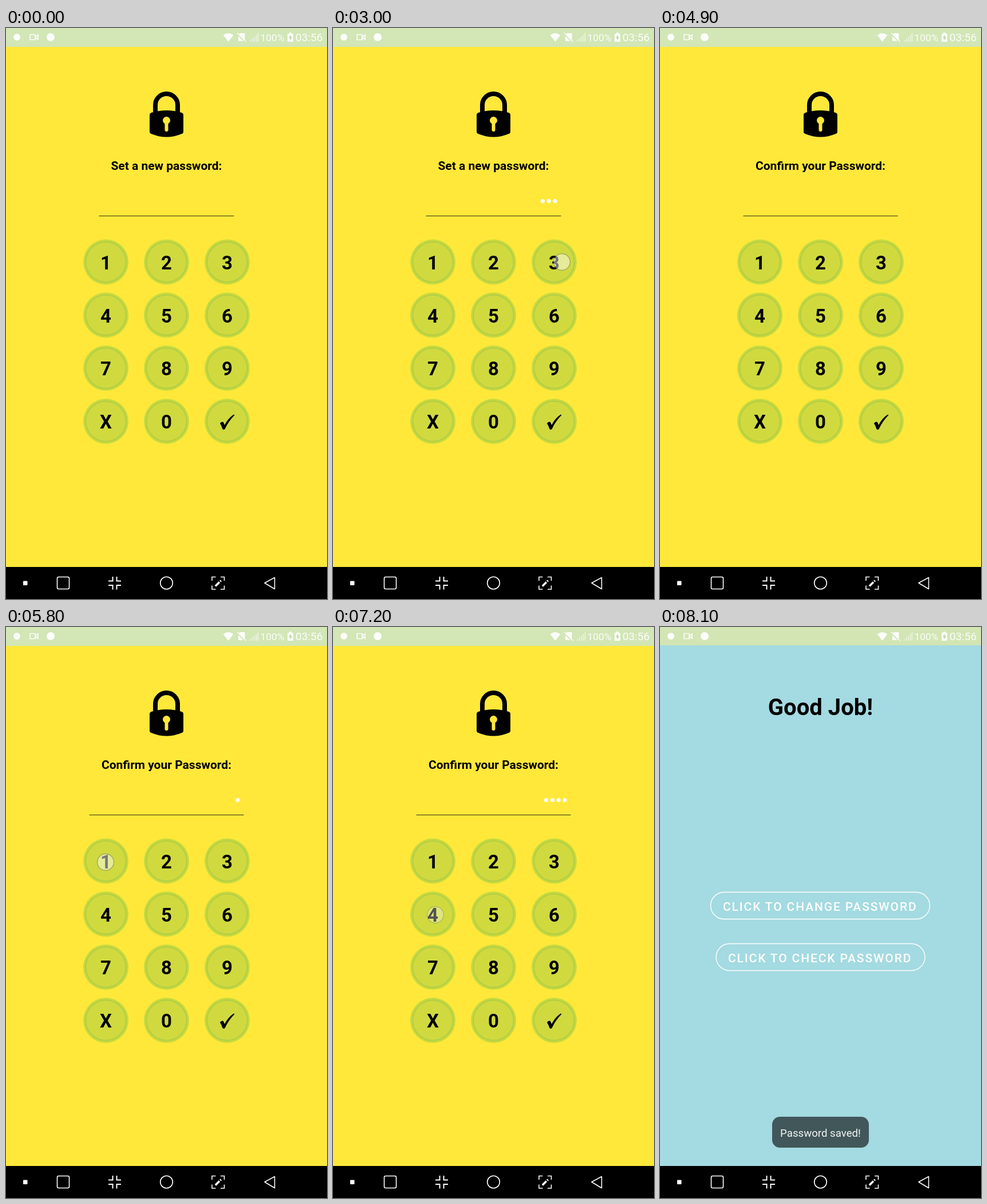
Write an HTML page that moves like this. It is 561 px wide and 998 px high and loops after 9.8 s.

```html
<!DOCTYPE html>
<html lang="en">
<head>
<meta charset="utf-8">
<title>Password keypad</title>
<style>
  html, body { margin: 0; width: 100%; height: 100%; overflow: hidden; }
  svg { display: block; width: 561px; height: 998px; font-family: Roboto, sans-serif; }
  .bold { font-weight: 700; text-anchor: middle; }
  .button { font-size: 21px; font-weight: 500; letter-spacing: 1.87px; fill: #fff; }
  .pill { fill: none; stroke: #fff; stroke-width: 1.4; }
</style>
</head>
<body>
<svg viewBox="0 0 561 998">
  <g id="lockPage">
    <rect width="561" height="998" fill="#ffe83a"/>
    <rect width="561" height="33" fill="#d2e6b6"/>
    <path d="M261 150V134.500a19.500 19.500 0 0 1 39 0V150" fill="none" stroke="#000" stroke-width="8"/>
    <path d="M251 152q0-3 3-4Q280.500 140 307 148q3 1 3 4V181q0 3-3 4Q280.500 196 254 185q-3-1-3-4z"/>
    <circle cx="280.5" cy="161.500" r="6.500" fill="#ffe83a"/>
    <path d="M280.500 162V178" stroke="#ffe83a" stroke-width="6" stroke-linecap="round"/>
    <text id="prompt" class="bold" x="280.5" y="248" font-size="21"></text>
    <path id="underline" stroke="#000" stroke-opacity=".8"/>
    <g id="dots" fill="#fff"></g>
    <g id="keys"></g>
    <path d="M374 691q3-4 6-2l2 5Q388 682 398 675.500l1.500 1Q389 687 382.500 701q-2 2-4 0Q377 696 374 691z"/>
    <circle id="touch" r="14.500" fill="#fff" stroke="#777" stroke-width="1.500"/>
  </g>

  <g id="donePage">
    <rect width="561" height="998" fill="#a4dae1"/>
    <rect width="561" height="32" fill="#d2e5b3"/>
    <text class="bold" x="280.5" y="154" font-size="40">Good Job!</text>
    <rect class="pill" x="88.5" y="463.5" width="383" height="47" rx="23.500"/>
    <text class="button" x="110" y="496">CLICK TO CHANGE PASSWORD</text>
    <rect class="pill" x="98" y="553.5" width="365" height="47" rx="23.500"/>
    <text class="button" x="119" y="586">CLICK TO CHECK PASSWORD</text>
  </g>

  <g id="toast">
    <rect x="196" y="856" width="169" height="54" rx="13.500" fill-opacity=".6"/>
    <text x="280.5" y="890.500" font-size="18.670" text-anchor="middle" fill="#f4f4f4">Password saved!</text>
  </g>

  <!-- status bar -->
  <g fill="#fff" opacity=".92">
    <circle cx="19" cy="16" r="6"/>
    <path d="M42 11.500h9v9h-9zM52 15l4-3v8l-4-3" fill="none" stroke="#fff" stroke-width="1.700"/>
    <circle cx="78" cy="16" r="7"/>
    <path d="M379.500 12.500Q388.500 5.500 397.500 12.500L388.500 24z"/>
    <path d="M409 9h8.500v14H406V12z"/>
    <path d="M403.500 9.500L419 25" stroke="#d2e6b6" stroke-width="3"/>
    <path d="M404 8.500L419.500 24" stroke="#fff" stroke-width="1.500"/>
    <path d="M427 24v-3M430.500 24v-6M434 24v-9M437.500 24v-12M440.500 24V8.500" stroke="#fff" stroke-width="1.800" opacity=".55"/>
    <text x="444.5" y="23" font-size="17.300">100%</text>
    <path d="M492 10h3V8h4v2h3v14h-10z"/>
    <path d="M498 11.500l-4 6h2.500v4.500l4-6H498z" fill="#c2d5a5"/>
    <text x="506" y="23" font-size="19">03:56</text>
  </g>

  <!-- navigation bar -->
  <rect y="942" width="561" height="56"/>
  <g fill="none" stroke="#fff" stroke-width="1.600">
    <rect x="30" y="966.500" width="7.500" height="7.500" rx="1" fill="#fff" stroke="none"/>
    <rect x="89.500" y="959.500" width="21" height="21" rx="2.500"/>
    <path d="M179 966.500h7.500V959M201 966.500h-7.500V959M179 974h7.500v7.500M201 974h-7.500v7.500" stroke-width="2"/>
    <circle cx="280.500" cy="970" r="10.800"/>
    <path d="M360 966v-6.500h6.500M375 959.500h6.500v6.500M381.500 974.500v6.500H375M366.500 981H360v-6.500"/>
    <path d="M366 975.500l7-7" stroke-width="3.500"/>
    <path d="M374.300 967.200l1.500-1.500" stroke-width="3.500"/>
    <path d="M452 970L469.500 960.500v20z" stroke-linejoin="round"/>
  </g>
</svg>

<script>
const LOOP = 9800, CONFIRM = 4800, DONE = 8100, STEP = 100;
// start time, steps visible, x, y
const taps = [
  [2000, 2, 176, 411], [2400, 3, 282, 411], [2900, 3, 400, 409], [3500, 3, 180, 503], [4600, 2, 401, 686],
  [5700, 2, 174, 411], [6100, 3, 282, 411], [6600, 3, 400, 409], [7000, 3, 179, 503], [7700, 2, 400, 686]
];
const digitTimes = taps.filter((_, i) => i % 5 < 4).map(tap => tap[0] + STEP);

const el = id => document.getElementById(id);
const show = (node, visible) => node.setAttribute("display", visible ? "inline" : "none");

el("keys").innerHTML = [..."123456789X0", ""].map((label, i) => {
  const x = 174.5 + i % 3 * 106, y = 409 + Math.floor(i / 3) * 92.8;
  return `<circle cx="${x}" cy="${y}" r="39.5" fill="#c8da3d"/>
    <circle cx="${x}" cy="${y}" r="35.3" fill="#d0da3f" stroke="#b5cf45" stroke-width="2.6"/>
    <text class="bold" x="${x}" y="${y + 12.7}" font-size="33">${label}</text>`;
}).join("");
el("dots").innerHTML = '<circle cy="302.5" r="3.6"/>'.repeat(4);
const dots = [...el("dots").children];

function render(t) {
  const confirming = t >= CONFIRM, done = t >= DONE;
  show(el("lockPage"), !done);
  show(el("donePage"), done);

  el("prompt").textContent = confirming ? "Confirm your Password:" : "Set a new password:";
  const halfLine = confirming ? 135 : 118;
  el("underline").setAttribute("d", `M${280.5 - halfLine} 328.5h${2 * halfLine}`);

  const count = digitTimes.filter(at => at <= t && at > CONFIRM === confirming).length;
  dots.forEach((dot, i) => {
    show(dot, i < count);
    dot.setAttribute("cx", 270 + halfLine - (count - 1 - i) * 10.8);
  });

  const tap = taps.find(([at, steps]) => t >= at && t < at + steps * STEP);
  show(el("touch"), tap);
  if (tap) {
    const [at, , x, y] = tap;
    el("touch").setAttribute("cx", x);
    el("touch").setAttribute("cy", y);
    el("touch").setAttribute("opacity", 0.62 - 0.15 * Math.floor((t - at) / STEP));
  }

  show(el("toast"), t >= 7900);
  el("toast").setAttribute("opacity", t < 8000 ? 0.5 : 1);
}

function tick() {
  render(performance.now() % LOOP);
  requestAnimationFrame(tick);
}
tick();
</script>
</body>
</html>
```
